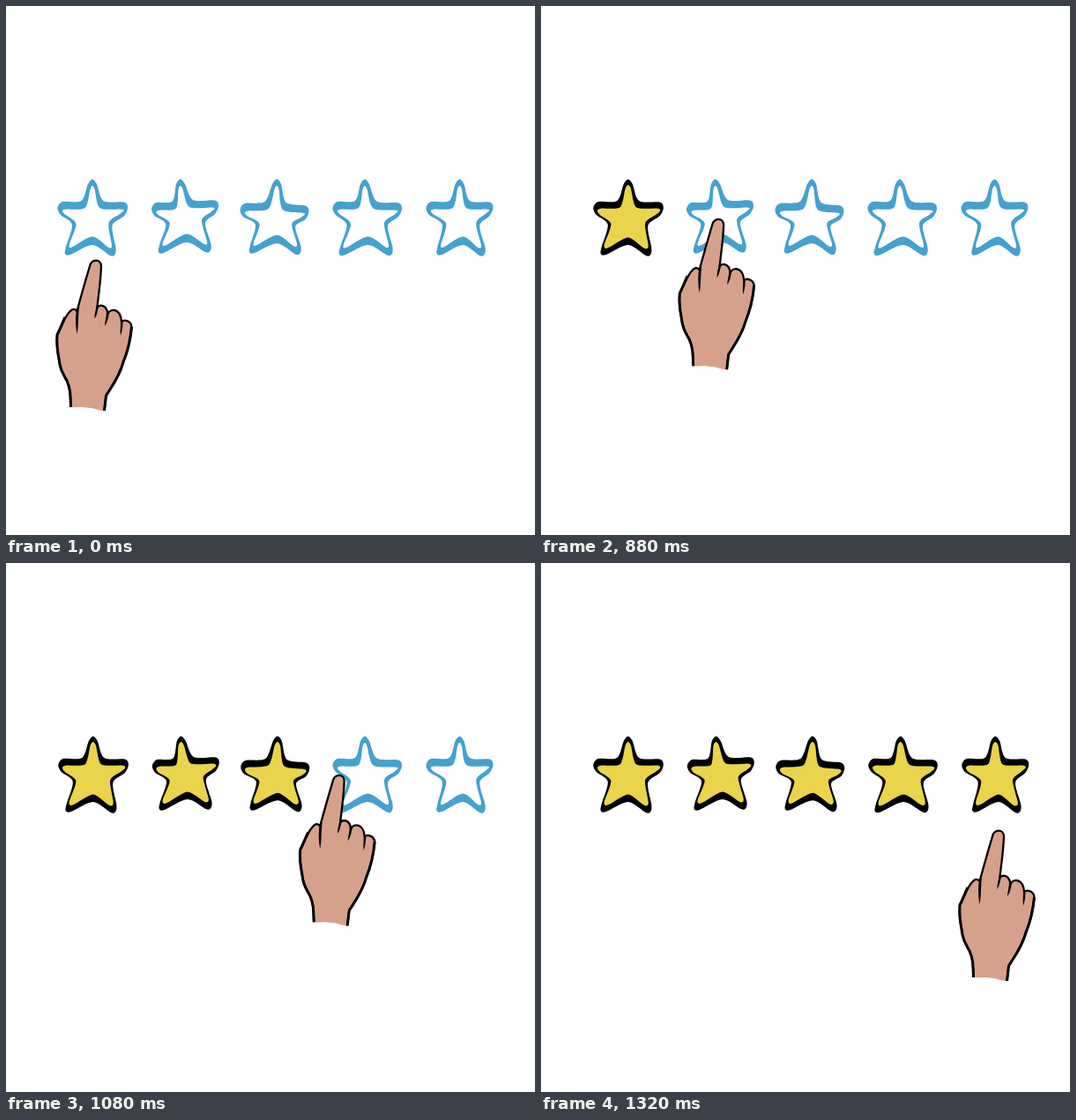
These frames come from a looping animation (600 by 600 pixels, 2.04 s). An HTML page with a canvas:

```html
<!DOCTYPE html>
<html lang="en">
<head>
<meta charset="utf-8">
<title>Star rating</title>
<style>
  html, body { margin: 0; width: 100%; height: 100%; overflow: hidden; background: #fff; }
  canvas { display: block; }
</style>
</head>
<body>
<canvas id="stage" width="600" height="600"></canvas>
<script>
const ctx = document.getElementById('stage').getContext('2d');
const LOOP = 2040, STEP = 40, MOVE_START = 720;
const BLUE = '#45a1cf', YELLOW = '#e9d44b', SKIN = '#d6a18b', BLACK = '#000';

// Tips of each star: top, right arm, right foot, left foot, left arm.
const starTips = [
  [[98, 196.5], [138, 229], [124, 283], [67, 282], [58.5, 229]],
  [[198, 196.5], [241, 227], [232, 279], [173, 280], [165, 230]],
  [[307, 196.5], [343.5, 233], [334, 281.5], [276, 280], [265.5, 231]],
  [[407, 196.5], [449, 230], [438, 282.5], [378, 282.5], [370.5, 229]],
  [[514.5, 196.5], [552.5, 229], [543, 283], [488.5, 282], [476.5, 229]]
];
const fillTimes = [840, 960, 1080, 1200, 1240];

// Each tip owns three points; every fourth point is the notch after it.
const outerRing = [
  [93, 202], [98, 196.5], [103, 202], [110.5, 221],
  [134, 222.5], [138, 229], [134, 238], [120.5, 249],
  [124.5, 274], [123.5, 282], [118, 283], [98, 271],
  [73, 282], [67, 281], [68, 273], [75, 248],
  [62, 237], [58.5, 229], [64, 222], [85.5, 221]
];
const innerRing = [
  [95.5, 208], [98, 204], [100.5, 208], [106.5, 229],
  [130, 230.5], [133.5, 232], [129, 236], [116.5, 246],
  [120, 271], [118.5, 274.5], [115, 273], [98, 261.5],
  [77, 272.5], [72.5, 274], [72, 270], [79.5, 247],
  [67, 236.5], [64, 232.5], [68, 230.5], [89.5, 229]
];

function fitRing(ring, tips) {
  const shift = tips.map((p, i) => [p[0] - starTips[0][i][0], p[1] - starTips[0][i][1]]);
  return ring.map(([x, y], i) => {
    const a = shift[i >> 2];
    const b = i % 4 === 3 ? shift[((i >> 2) + 1) % 5] : a;
    return [x + (a[0] + b[0]) / 2, y + (a[1] + b[1]) / 2];
  });
}

function smoothPath(points) {
  const path = new Path2D(), n = points.length, k = 0.14;
  path.moveTo(...points[0]);
  for (let i = 0; i < n; i++) {
    const [a, b, c, d] = [n - 1, 0, 1, 2].map(j => points[(i + j) % n]);
    path.bezierCurveTo(
      b[0] + (c[0] - a[0]) * k, b[1] + (c[1] - a[1]) * k,
      c[0] - (d[0] - b[0]) * k, c[1] - (d[1] - b[1]) * k, c[0], c[1]);
  }
  path.closePath();
  return path;
}

const stars = starTips.map(tips => ({
  outer: smoothPath(fitRing(outerRing, tips)),
  inner: smoothPath(fitRing(innerRing, tips))
}));

const handShape = new Path2D(
  'M73.5 455 C73 440 73 434 69 425 C64 416 61 411 60 400 C57.5 388 57.5 380 58 373' +
  ' C63 363 67 352 72 347 C75 343.5 78 342.5 80.5 346 C84 333 90 312 95 295' +
  ' C96.5 287 107.5 286 108 295 C107.5 312 105 326 103.5 342 C106 338.5 114 338 115.5 349' +
  ' C119 342.5 130 343 131 358 C134 355 142 357 142.5 364 C141 380 138 392 133 404' +
  ' C128 422 120 431 113.5 442 L111.5 459');
const wristEdge = ' C104 459 98 455 90 455.5 C84 454 78 456 73.5 455 Z';
const handFill = new Path2D(handShape);
handFill.addPath(new Path2D('M73.5 455 L111.5 459' + wristEdge));
const creases = new Path2D(
  'M80 344 C78.5 355 79 363 80.5 372 C82.5 363 81.5 354 83 342 Z' +
  'M103 338 C102 344 100 350 100.5 355 C103 351 104 346 105 340 Z' +
  'M114 347 C114 353 112 358 112 363 C115 359 116 354 117 348 Z' +
  'M130 355 C130.5 361 129 367 130 374 C132 368 132.5 362 132.5 357 Z');
const leftEdge = new Path2D('M73.5 455 C73 440 73 434 69 425 C64 416 61 411 60 400' +
  ' C57.5 388 57.5 380 58 373 C62 365 64 359 67 353');
const rightEdge = new Path2D('M142.5 364 C141 380 138 392 133 404 C128 422 120 431 113.5 442 L111.5 459');

function handOffset(time) {
  if (time < MOVE_START) return [0, 0];
  const n = Math.floor((time - MOVE_START) / STEP);
  if (n === 0) return [-33, -24];
  if (n <= 13) return [-42 + 35.3 * n, -48.3 + 7 * Math.abs((n - 7) / 6) ** 2.2];
  return n === 14 ? [447, -17] : [417, 15];
}

function drawStar({ outer, inner }, filled) {
  ctx.save();
  if (filled) ctx.translate(0.8, 0);
  ctx.fillStyle = filled ? BLACK : BLUE;
  ctx.fill(outer);
  ctx.fillStyle = filled ? YELLOW : '#fff';
  ctx.fill(inner);
  if (filled) {
    ctx.strokeStyle = YELLOW;
    ctx.lineWidth = 1.8;
    ctx.stroke(inner);
  }
  ctx.restore();
}

function drawHand(x, y) {
  ctx.save();
  ctx.translate(x, y);
  ctx.fillStyle = SKIN;
  ctx.fill(handFill);
  ctx.strokeStyle = ctx.fillStyle = BLACK;
  ctx.lineJoin = 'round';
  ctx.lineWidth = 2.3;
  ctx.stroke(handShape);
  ctx.lineWidth = 3;
  ctx.stroke(leftEdge);
  ctx.stroke(rightEdge);
  ctx.fill(creases);
  ctx.restore();
}

function render(now) {
  const time = now % LOOP;
  ctx.fillStyle = '#fff';
  ctx.fillRect(0, 0, 600, 600);
  stars.forEach((star, i) => drawStar(star, time >= fillTimes[i]));
  drawHand(...handOffset(time));
  requestAnimationFrame(render);
}
render(0);
</script>
</body>
</html>
```
